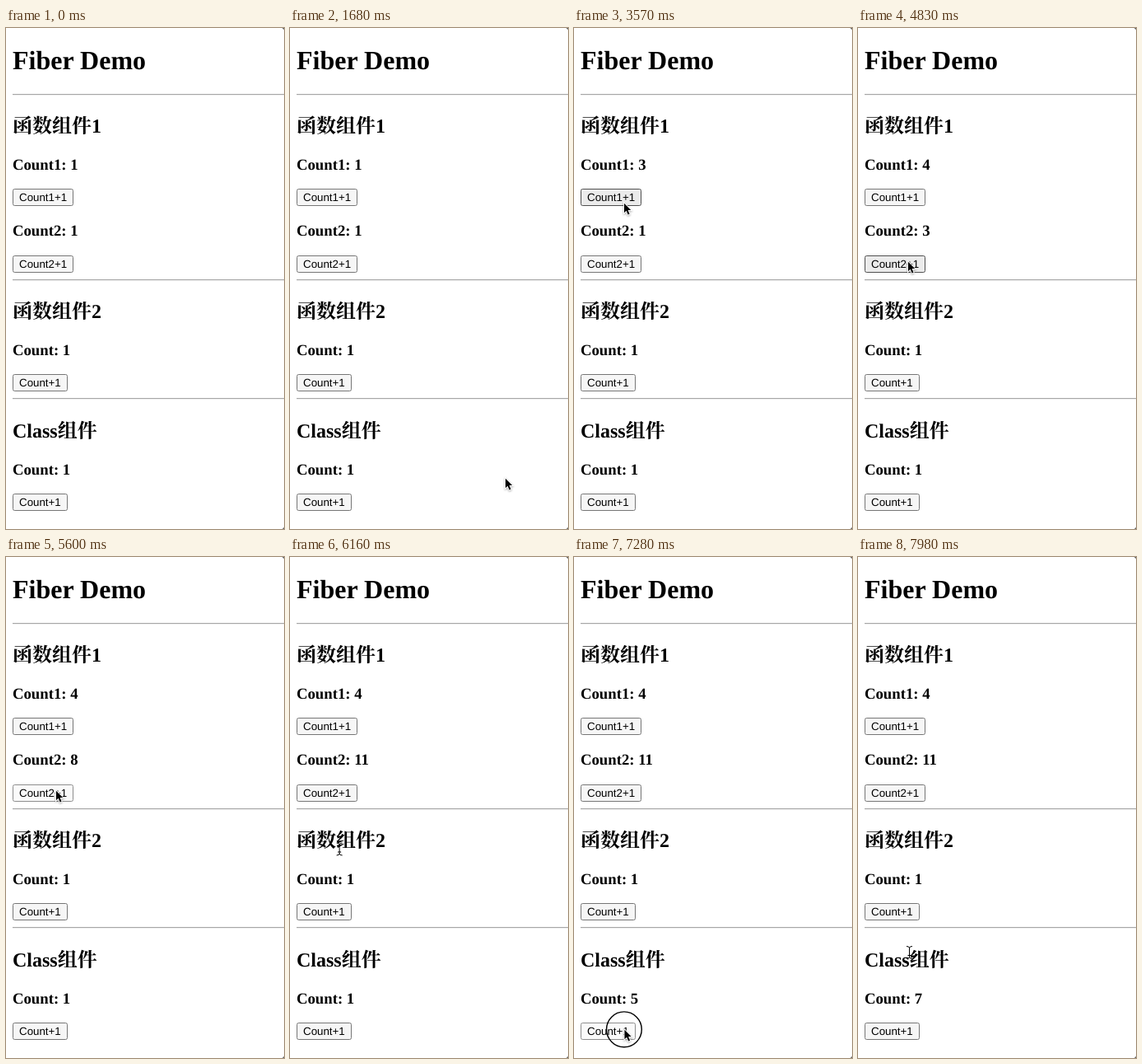
Recreate the animation shown at these times as an HTML page. Size 338x608 px, loop 8 s.

```html
<!DOCTYPE html>
<html lang="zh">
<head>
<meta charset="utf-8">
<title>Fiber Demo</title>
<style>
  html, body { margin: 0; width: 100%; height: 100%; overflow: hidden; background: #fff; }
  svg { display: block; width: 338px; height: 608px; }
  text { white-space: pre; text-rendering: geometricPrecision; }
  .head { font-family: "Liberation Serif", "Noto Serif CJK SC", "Noto Sans CJK SC", serif; font-weight: 700; }
  .btn rect { fill: #f6f6f6; stroke: #767676; }
  .btn text { font: 13.333px "Liberation Sans", Arial, sans-serif; }
  .btn.hover rect { fill: #ebebeb; stroke: #4f4f4f; }
  .btn.down rect { fill: #fafafa; stroke: #8d8d8d; }
  #arrow { stroke: #fff; stroke-width: 2; paint-order: stroke; filter: drop-shadow(0 1px 1px #0005); }
  #beam, #ring { fill: none; stroke: #000; }
  #ring { stroke-width: 1.4; }
</style>
</head>
<body>
<svg viewBox="0 0 338 608">
  <g id="page"></g>
  <path d="M335.5 0H338V2.5Q337.5 .5 335.5 0ZM335.5 608H338V605.5Q337.5 607.5 335.5 608Z" fill="#555"/>
  <g id="cursor">
    <path id="arrow" transform="translate(0 .8) scale(.95)" d="M1 1V13.2L3.8 10.6 5.9 15.6 8 14.7 5.9 9.8H9.7Z"/>
    <path id="beam" d="M-3.5-7.5Q0-7.5 0-5.5Q0-7.5 3.5-7.5M0-6V6M-3.5 7.5Q0 7.5 0 5.5Q0 7.5 3.5 7.5M-2 3.5H2"/>
    <circle id="ring" cx=".4" cy="1.3" r="21.4"/>
  </g>
</svg>
<script>
const STEP = 70, LOOP = 8000, CURSOR_IN = 420;
const $ = id => document.getElementById(id);
const page = $("page");

const sections = [
  { y: 80, title: "函数组件1", names: ["Count1", "Count2"] },
  { y: 305, title: "函数组件2", names: ["Count"] },
  { y: 449.5, title: "Class组件", names: ["Count"] }
];
const counters = sections.flatMap(({ y, names }) => names.map((name, i) => ({
  name,
  y: y + 92 + 80 * i,
  top: Math.round(y + 115 + 80.5 * i),
  w: name.length > 5 ? 74 : 67
})));

// The cursor rests at each point until the next move starts.
const moves = [
  { from: 0, to: 0, x: 261, y: 545 },
  { from: 1820, to: 1960, x: 134.5, y: 192 },
  { from: 2170, to: 2450, x: 60, y: 211 },
  { from: 3850, to: 4340, x: 60, y: 282 },
  { from: 6090, to: 6370, x: 60.5, y: 572 },
  { from: 7770, to: 7980, x: 62.5, y: 480 }
];

// Runs of evenly spaced clicks; a missing target is empty page.
const SLOW = 140, QUICK = 70;
const bursts = [
  { start: 1330, n: 1, every: 280, hold: SLOW },
  { start: 2520, n: 2, every: 280, hold: SLOW, target: 0 },
  { start: 3640, n: 1, every: 280, hold: SLOW, target: 0 },
  { start: 4410, n: 1, every: 280, hold: SLOW, target: 1 },
  { start: 4760, n: 9, every: 140, hold: QUICK, target: 1 },
  { start: 6510, n: 6, every: 182, hold: SLOW, target: 3 }
];

const heading = (y, size, text) =>
  `<text class="head" x="8" y="${y}" font-size="${size}">${text}</text>`;
const rule = y =>
  `<path d="M8 ${y + .5}H338" stroke="#a6a6a6"/><path d="M8 ${y + 1.5}H338" stroke="#eee"/>`;
const button = ({ name, top, w }) =>
  `<g class="btn"><rect x="8.5" y="${top + .5}" width="${w - 1}" height="20" rx="2"/>
   <text x="16" y="${top + 15}">${name}+1</text></g>`;

page.innerHTML = heading(50, 32, "Fiber Demo") +
  sections.map(s => rule(Math.floor(s.y)) + heading(s.y + 47.4, 24, s.title)).join("") +
  counters.map(c => heading(c.y, 18.72, c.name + ": 1") + button(c)).join("");

const lines = [...page.querySelectorAll(".head")];
const labels = lines.slice(-counters.length);
const buttons = [...page.querySelectorAll(".btn")];

const clamp = (v, lo, hi) => Math.min(hi, Math.max(lo, v));
const begun = (b, t) => clamp(Math.floor((t - b.start) / b.every) + 1, 0, b.n);
const done = (b, t) => begun(b, t - b.hold);

function position(t) {
  let { x, y } = moves[0];
  for (const m of moves.slice(1)) {
    const k = clamp((t - m.from) / (m.to - m.from), 0, 1);
    x += (m.x - x) * k;
    y += (m.y - y) * k;
  }
  return [x, y];
}

function overText(x, y) {
  return lines.some(el => {
    const base = +el.getAttribute("y"), size = +el.getAttribute("font-size");
    return y > base - .88 * size && y < base + .22 * size && x < 8 + el.getComputedTextLength();
  });
}

const show = (el, on) => el.setAttribute("visibility", on ? "visible" : "hidden");

function draw() {
  const t = Math.floor(performance.now() % LOOP / STEP) * STEP;
  const [x, y] = position(t);
  const visible = t >= CURSOR_IN;
  const text = overText(x, y);
  const press = bursts.find(b => begun(b, t) > done(b, t));

  counters.forEach((c, i) => {
    const count = bursts.reduce((sum, b) => sum + (b.target === i ? done(b, t) : 0), 1);
    labels[i].textContent = `${c.name}: ${count}`;
    const hover = x > 8 && x < 8 + c.w && y >= c.top && y < c.top + 21;
    buttons[i].classList.toggle("hover", hover);
    buttons[i].classList.toggle("down", press?.target === i);
  });

  $("cursor").setAttribute("transform", `translate(${x} ${y})`);
  show($("arrow"), visible && !text);
  show($("beam"), visible && text);
  show($("ring"), press?.hold === SLOW);
  requestAnimationFrame(draw);
}
draw();
</script>
</body>
</html>
```
